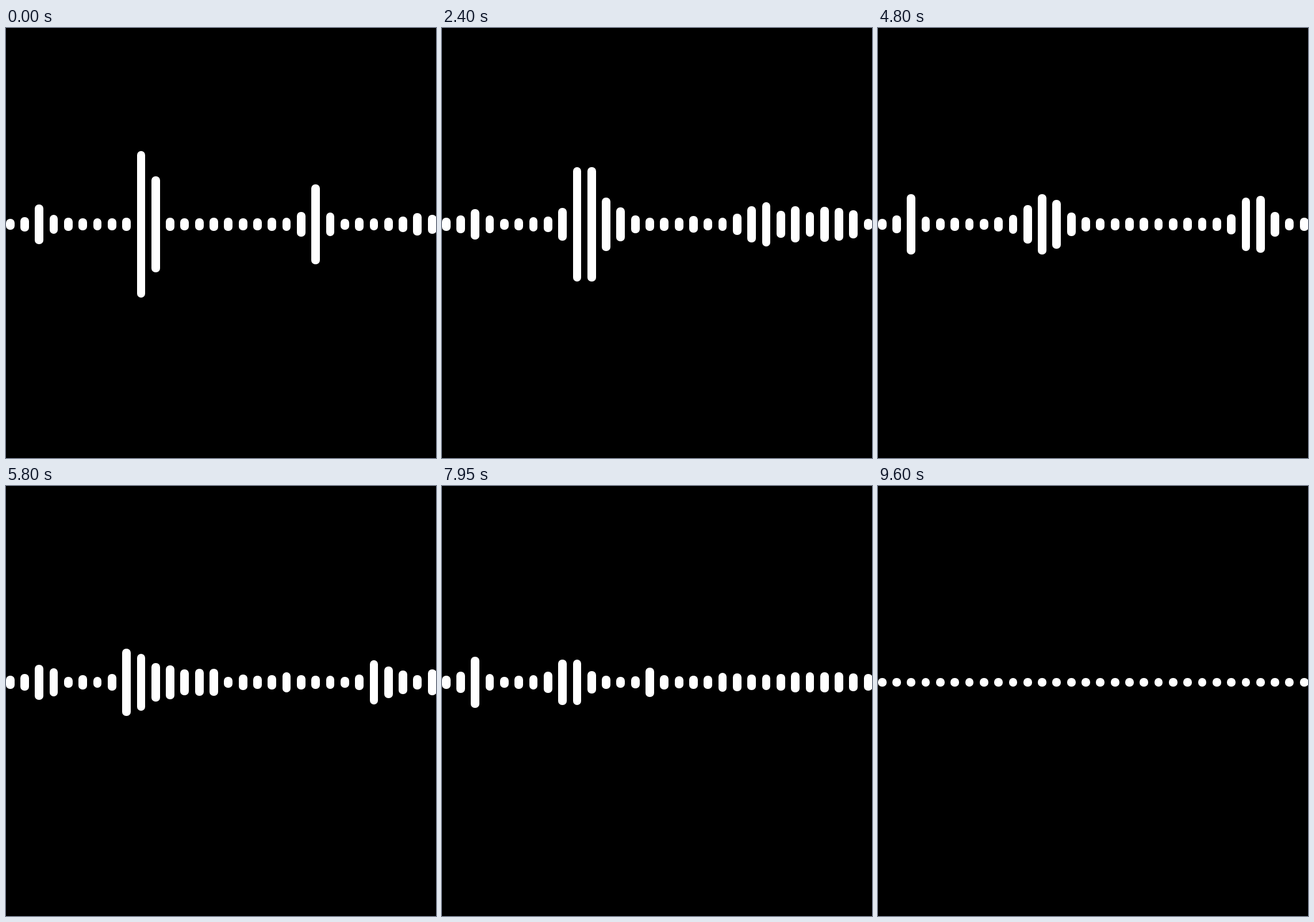
Write an HTML page with a canvas that moves like this. It is 748x748 px and loops after 9.65 s.

```html
<!DOCTYPE html>
<html lang="en">
<head>
<meta charset="utf-8">
<title>Audio bars</title>
<style>
  html, body { margin: 0; width: 100%; height: 100%; overflow: hidden; background: #000; }
  canvas { display: block; }
</style>
</head>
<body>
<canvas width="748" height="748"></canvas>
<script>
const ctx = document.querySelector('canvas').getContext('2d');
const LOOP = 9650, STEP = 50, COUNT = 30, MID = 341.5;
const DOT = 15, WIDTH = 14.8, PITCH = 25.31, LEFT = -0.25;

// Spectrum at key moments: each peak is [bar, height, spread].
const poses = [
  { at: 0, peaks: [[2.1, 46, .75], [9.4, 339, .66], [21, 118, .75], [28.2, 18, 1.2]] },
  { at: 1550, peaks: [[2.1, 53, .8], [9.48, 240, .87], [11.5, 55, 1.8],
                      [20.8, 62, 1.25], [23.2, 72, 1.5], [26.6, 52, 1.6]] },
  { at: 3350, peaks: [[1.9, 33, .8], [8.2, 72, .8], [9.7, 55, 1.1]] },
  { at: 4800, peaks: [[2, 82, .65], [11.2, 85, 1.55], [25.55, 88, 1.2]] },
  { at: 6850, peaks: [[2.1, 46, .9], [8.5, 154, .99], [13.8, 34, .9], [19.2, 46, .8], [29, 36, 1.3]] },
  { at: 7950, peaks: [[1.9, 70, .7], [8.5, 68, 1.3], [14, 29, .6], [19.5, 13, 1], [26, 15, 4]] }
];
for (const pose of poses) pose.bars = spectrum(pose);
poses.push({ at: LOOP, bars: poses[0].bars });

function bump(d, spread) {
  return Math.exp(-((d / spread) ** 2));
}

function rand(a, b) {
  const s = Math.sin(a * 127.1 + b * 311.7) * 43758.5453;
  return s - Math.floor(s);
}

// Smooth noise in time, from -1 to 1
function noise(i, t) {
  const n = Math.floor(t), f = t - n, u = f * f * (3 - 2 * f);
  return 2 * (rand(i, n) * (1 - u) + rand(i, n + 1) * u) - 1;
}

function spectrum({ at, peaks }) {
  return Array.from({ length: COUNT }, (_, i) =>
    peaks.reduce((sum, [bar, height, spread]) => sum + height * bump(i - bar, spread),
      19 + 5 * rand(i, at)));
}

// One beat per second, louder every fourth second
function beat(t) {
  const n = Math.max(0, Math.floor((t - STEP) / 1000));
  const age = t - n * 1000 - 450;
  return {
    bar: 8.5 + n % 3 / 2,
    height: 300 - 55 * Math.cos(n * Math.PI / 2),
    level: age < 0 ? Math.max(0, 1 + age / 150) : Math.exp(-age / 160)
  };
}

function heights(t) {
  if (t >= LOOP - STEP) return Array(COUNT).fill(DOT);
  const p = poses.findIndex((q, k) => t < poses[k + 1].at);
  const from = poses[p], to = poses[p + 1];
  const mix = (t - from.at) / (to.at - from.at);
  const free = Math.min(1, (t - from.at) / 200, (to.at - t) / 200);
  const { bar, height, level } = beat(t);

  return from.bars.map((h, i) => {
    const base = h + (to.bars[i] - h) * mix;
    const wave = DOT + (base - DOT) * Math.exp(0.7 * free * noise(i, t / 150));
    const kick = DOT + (height - DOT) * free * level * bump(i - bar, 1.1);
    return Math.max(DOT, wave, kick);
  });
}

// Edges sit on whole pixels to stay crisp.
function addBar(h, i) {
  const x = LEFT + i * PITCH;
  const left = Math.round(x), right = Math.round(x + WIDTH);
  const top = Math.round(MID - h / 2);
  ctx.roundRect(left, top, right - left, 2 * (MID - top), 7);
}

function draw(now) {
  const t = Math.floor(now % LOOP / STEP) * STEP;
  ctx.fillStyle = '#000';
  ctx.fillRect(0, 0, 748, 748);
  ctx.fillStyle = '#fff';
  ctx.beginPath();
  heights(t).forEach(addBar);
  ctx.fill();
}

let start;
function tick(now) {
  start ??= now;
  draw(now - start);
  requestAnimationFrame(tick);
}
draw(0);
requestAnimationFrame(tick);
</script>
</body>
</html>
```
